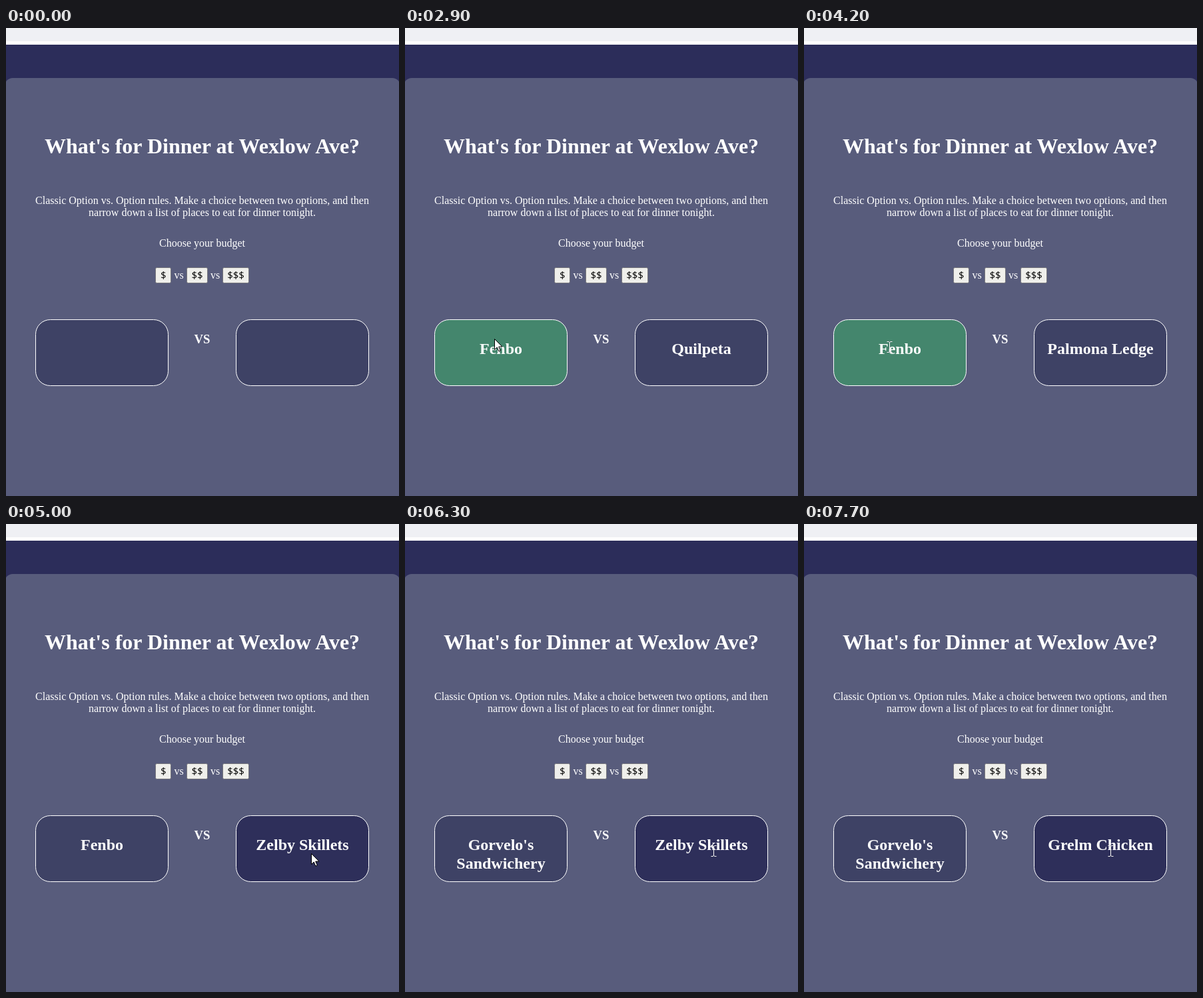
Recreate the animation shown at these times as an HTML page. Size 590 px wide and 702 px high, loop 8000 ms.

```html
<!DOCTYPE html>
<html lang="en">
<head>
<meta charset="utf-8">
<title>What's for Dinner</title>
<style>
  html, body { margin: 0; width: 100%; height: 100%; overflow: hidden; background: #2c2d5a; }
  svg { display: block; }
  text { font: 16px "Liberation Serif", serif; fill: #fff; text-anchor: middle; }
  .title { font-size: 32px; font-weight: bold; }
  .versus { font-size: 18.72px; font-weight: bold; }
  .option text { font-size: 24px; font-weight: bold; }
  .option rect { stroke: #fff; }
  .button rect { fill: #efefeb; stroke: #77777c; }
  .button text { font: 15px "Open Sans", sans-serif; fill: #000; }
</style>
</head>
<body>
<svg width="590" height="702" viewBox="0 0 590 702">
  <rect width="590" height="20" fill="#eff0f4"/>
  <rect y="20" width="590" height="5" fill="#fff"/>
  <rect x="-2" y="75" width="594" height="640" rx="12" fill="#585c7c"/>
  <text class="title" x="294.5" y="188">What's for Dinner at Wexlow Ave?</text>
  <text x="294.5" y="264">Classic Option vs. Option rules. Make a choice between two options, and then</text>
  <text x="294.5" y="282">narrow down a list of places to eat for dinner tonight.</text>
  <text x="294.5" y="328">Choose your budget</text>
  <g class="button"><rect x="224.5" y="359.5" width="23" height="23" rx="2"/><text x="236.2" y="376">$</text></g>
  <text x="259.7" y="376">vs</text>
  <g class="button" id="budget"><rect x="271.5" y="359.5" width="31" height="23" rx="2"/><text x="287" y="376">$$</text></g>
  <text x="314" y="376">vs</text>
  <g class="button"><rect x="325.5" y="359.5" width="39" height="23" rx="2"/><text x="345" y="376">$$$</text></g>
  <g class="option" id="left"><rect x="44.5" y="437.5" width="199" height="99" rx="22"/><text></text></g>
  <text class="versus" x="294.5" y="473">VS</text>
  <g class="option" id="right"><rect x="345.5" y="437.5" width="199" height="99" rx="22"/><text></text></g>
  <g id="cursor">
    <path id="arrow" d="M.5.5V16.5L4.2 13 6.8 19 9.3 18 6.7 12.1H12Z" fill="#fff" stroke="#000"/>
    <g id="beam" fill="none">
      <path d="M-3.5-7.5H-1L.5-6.5 2-7.5H4.5M.5-6.5V7.5M-3.5 8.5H-1L.5 7.5 2 8.5H4.5" stroke="#333648" stroke-width="2" opacity=".35"/>
      <path d="M-3.5-7.5H-1L.5-6.5 2-7.5H4.5M.5-6.5V7.5M-3.5 8.5H-1L.5 7.5 2 8.5H4.5" stroke="#fff"/>
    </g>
  </g>
</svg>
<script>
const LOOP = 8000, STEP = 100;
const $ = id => document.getElementById(id);

// Pointer stops: time, x, y
const path = [
  [400, 483, 298], [1200, 284, 369], [2400, 284, 369], [2900, 134, 466],
  [3200, 148, 474], [3600, 148, 474], [3800, 124, 480], [3900, 128, 478],
  [4300, 128, 478], [4900, 455, 490], [5000, 458, 494], [5400, 463, 490],
  [6300, 463, 490], [6800, 150, 485], [7100, 150, 485], [7600, 460, 490]
];

const options = [
  { id: 'left', x: 44, cx: 144, hover: [68, 134, 109],
    names: [[0, ''], [1900, 'Fenbo'], [5500, "Gorvelo's|Sandwichery"]] },
  { id: 'right', x: 345, cx: 445, hover: [46, 47, 90],
    names: [[0, ''], [1900, 'Quilpeta'], [3200, 'Palmona Ledge'], [4300, 'Zelby Skillets'], [7100, 'Grelm Chicken']] }
];
const idle = [62, 66, 101];

function pointer(t) {
  const i = path.findIndex(p => p[0] > t);
  if (i < 0) return path[path.length - 1].slice(1);
  if (i === 0) return [-99, -99];
  const [t0, x0, y0] = path[i - 1], [t1, x1, y1] = path[i];
  const u = (t - t0) / (t1 - t0), k = u * u * (3 - 2 * u);
  return [x0 + (x1 - x0) * k, y0 + (y1 - y0) * k];
}

const inside = ([px, py], x, y, w, h) => px >= x && px < x + w && py >= y && py < y + h;

function setName(label, name, cx) {
  if (label.dataset.name === name) return;
  label.dataset.name = name;
  label.innerHTML = name.split('|')
    .map((line, i) => `<tspan x="${cx}" y="${489 + 28 * i}">${line}</tspan>`).join('');
}

function draw(t) {
  const p = pointer(t);
  let overText = false;

  for (const { id, x, cx, hover, names } of options) {
    const [box, label] = $(id).children;
    const over = time => +inside(pointer(time), x, 437, 200, 100);
    const mix = (over(t) + over(t - STEP)) / 2;
    box.style.fill = `rgb(${idle.map((c, i) => c + (hover[i] - c) * mix)})`;

    const name = names.filter(n => n[0] <= t).pop()[1];
    setName(label, name, cx);
    const b = label.getBBox();
    overText ||= name !== '' && inside(p, b.x, b.y, b.width, b.height);
  }

  const overBudget = inside(p, 271, 359, 32, 24);
  const pressed = t >= 1800 && t < 1900;
  const face = $('budget').firstElementChild;
  face.style.fill = pressed ? '#f5f5f5' : overBudget ? '#e4e4e2' : '';
  face.style.stroke = overBudget && !pressed ? '#4f4f4f' : '';

  $('cursor').setAttribute('transform', `translate(${p.map(Math.round)})`);
  $('arrow').style.display = overText ? 'none' : '';
  $('beam').style.display = overText ? '' : 'none';
}

const start = performance.now();
function tick() {
  const t = (performance.now() - start) % LOOP;
  draw(Math.floor(t / STEP) * STEP);
  requestAnimationFrame(tick);
}
tick();
</script>
</body>
</html>
```
